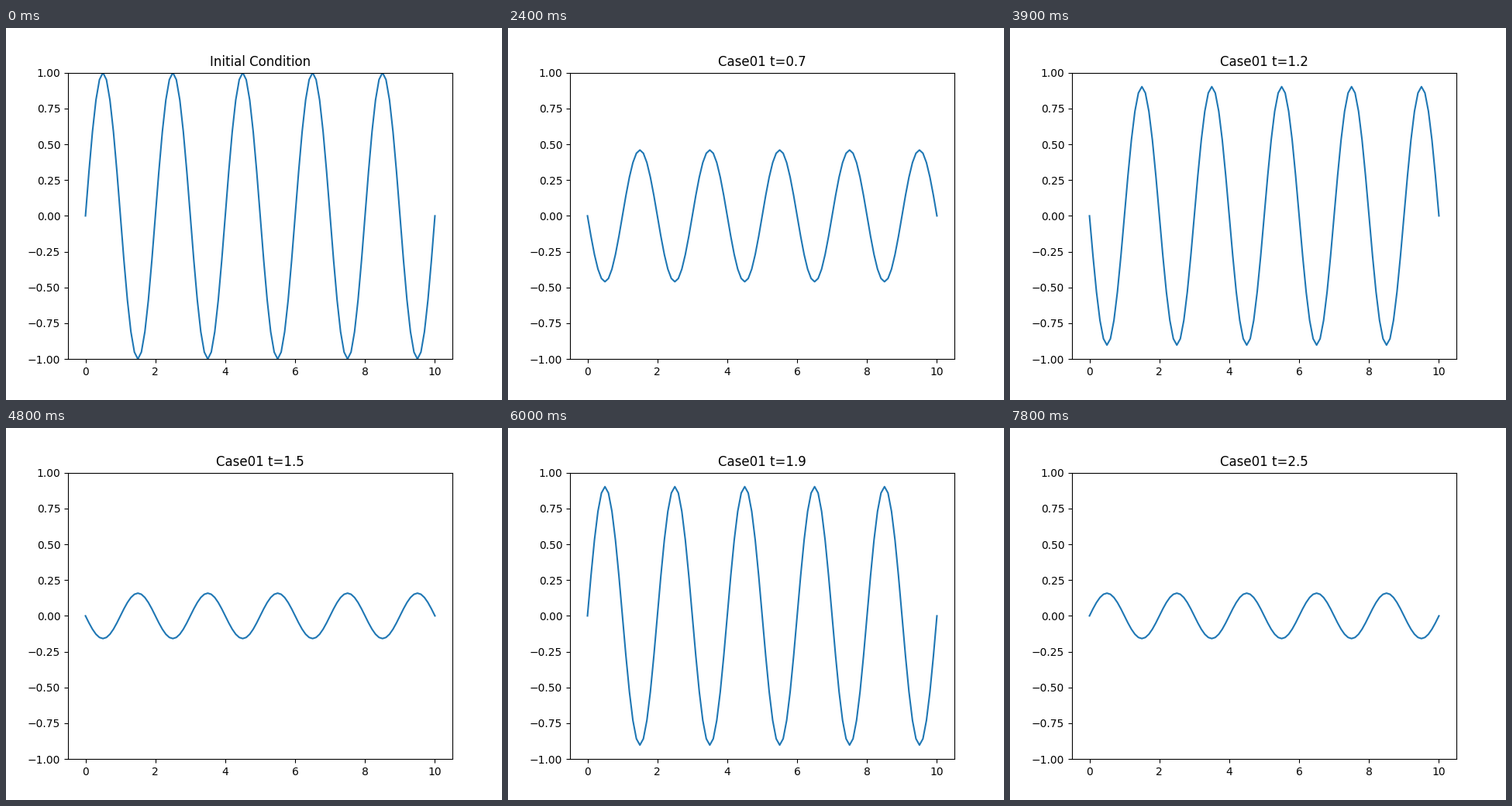
Animation of 640x480 px, one loop 8 s. Source, as a matplotlib script:

```python
import numpy as np
import matplotlib.pyplot as plt
from matplotlib.animation import FuncAnimation

TICK_MS = 100
LOOP_MS = 8000
TICKS_PER_STEP = 3
DT = 0.1

plt.rcParams["font.family"] = "DejaVu Sans"

x = np.linspace(0, 10, 101)
fig, ax = plt.subplots(figsize=(6.4, 4.8), dpi=100)
(line,) = ax.plot(x, np.sin(np.pi * x))
ax.set_ylim(-1, 1)
title = ax.set_title("Initial Condition")


def amplitude(step):
    """Standing wave from a leapfrog scheme whose first two levels are equal."""
    if step == 0:
        return 1.0
    theta = np.pi * DT
    return np.cos(theta * (step - 1.5)) / np.cos(theta / 2)


def update(tick):
    step = tick // TICKS_PER_STEP
    line.set_ydata(amplitude(step) * np.sin(np.pi * x))
    if step == 0:
        title.set_text("Initial Condition")
    else:
        title.set_text(f"Case01 t={(step - 1) * DT:.1f}")
    return line, title


anim = FuncAnimation(fig, update, frames=LOOP_MS // TICK_MS,
                     interval=TICK_MS, repeat=True, repeat_delay=0)
plt.show()
```
